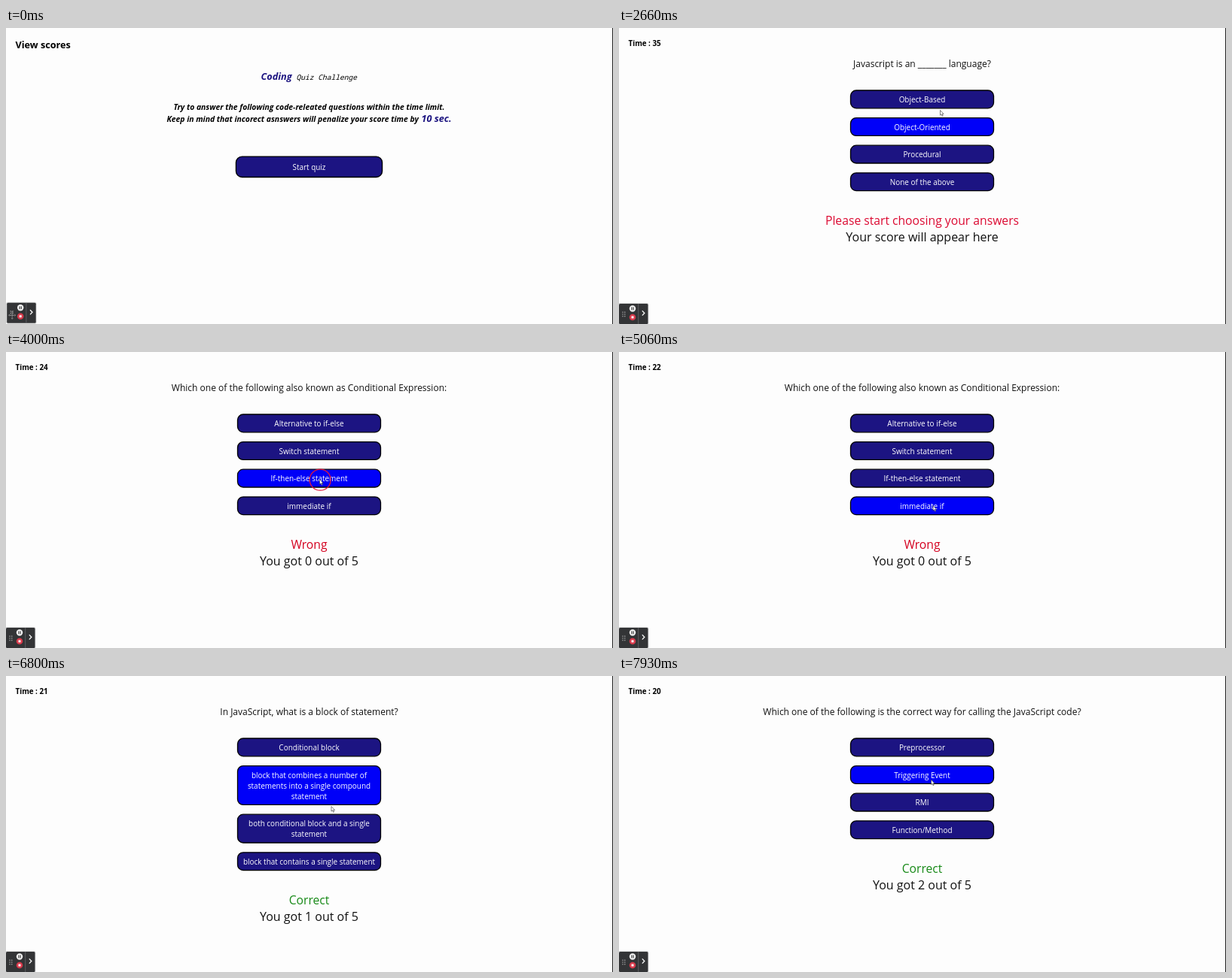
These frames come from a looping animation (806 px wide and 394 px high, 8000 ms). An HTML page:

```html
<!DOCTYPE html>
<html lang="en">
<head>
<meta charset="utf-8">
<title>Coding quiz</title>
<style>
  html, body { margin: 0; height: 100%; overflow: hidden; background: #fdfdfd; }
  svg { display: block; width: 100vw; height: 100vh; font-family: "Open Sans", "Noto Sans", sans-serif; }
  .mid { text-anchor: middle; }
  .bold { font-weight: 700; }
  .intro { font-weight: 700; font-style: italic; font-size: 10.38px; }
  .accent { fill: #1c1480; font-size: 12.7px; font-weight: 700; font-style: italic; }
  .mono { font: italic 500 9.6px "Noto Sans Mono", monospace; }
  .label { fill: #fff; font-size: 9.95px; }
</style>
</head>
<body>
<svg id="stage" viewBox="0 0 806 394"></svg>
<script>
const LOOP = 8000, CENTER = 402.5, HOVER_LAG = 100, SWITCH_DELAY = 40;
const LINE = 14, BUTTON_H = 23.8, GAP = 12.8, PENALTY = 10;
const RED = '#d4001f', GREEN = '#188a18';
const stage = document.getElementById('stage');

const questions = [
  { title: 'Javascript is an _______ language?',
    answers: ['Object-Based', 'Object-Oriented', 'Procedural', 'None of the above'],
    note: 'Please start choosing your answers', color: '#dc0a32', score: 'Your score will appear here' },
  { title: 'Which one of the following also known as Conditional Expression:',
    answers: ['Alternative to if-else', 'Switch statement', 'If-then-else statement', 'immediate if'],
    note: 'Wrong', color: RED, score: 'You got 0 out of 5' },
  { title: 'In JavaScript, what is a block of statement?',
    answers: ['Conditional block',
      'block that combines a number of|statements into a single compound|statement',
      'both conditional block and a single|statement',
      'block that contains a single statement'],
    note: 'Correct', color: GREEN, score: 'You got 1 out of 5' },
  { title: 'Which one of the following is the correct way for calling the JavaScript code?',
    answers: ['Preprocessor', 'Triggering Event', 'RMI', 'Function/Method'],
    note: 'Correct', color: GREEN, score: 'You got 2 out of 5' }
];

// Pointer path: [time, x, y]
const path = [
  [0, 8, 383], [460, 205, 290], [730, 205, 290], [1400, 390, 184.5], [2100, 390, 184.5],
  [2500, 424, 128], [2660, 426.5, 109.5], [2860, 427, 97], [3100, 425, 100],
  [3650, 416.5, 169.5], [4150, 416.5, 169.5], [4950, 417, 204.5], [5800, 417, 204.5],
  [6350, 427, 140], [6620, 430, 160], [6800, 432, 173.5], [7000, 430, 195],
  [7450, 414.5, 138], [LOOP, 414.5, 138]
];
const clicks = [2000, 3800, 5400, 7530];

const smooth = u => u * u * (3 - 2 * u);

function pointerAt(time) {
  const t = Math.max(0, time);
  const i = Math.max(1, path.findIndex(p => p[0] >= t));
  const [t0, x0, y0] = path[i - 1], [t1, x1, y1] = path[i];
  const u = smooth((t - t0) / (t1 - t0));
  return [x0 + (x1 - x0) * u, y0 + (y1 - y0) * u];
}

const text = (x, y, content, attrs) => `<text x="${x}" y="${y}" ${attrs}>${content}</text>`;
const centered = (y, content, size, fill = '#111') =>
  text(CENTER, y, content, `class="mid" font-size="${size}" fill="${fill}"`);

function button(y, width, height, lines, hover, radius) {
  const x = CENTER - width / 2, [hx, hy] = hover;
  const over = hx >= x && hx <= x + width && hy >= y && hy <= y + height;
  const first = y + height / 2 + 4.1 - (lines.length - 1) * LINE / 2;
  return `<rect x="${x}" y="${y}" width="${width}" height="${height}" rx="${radius}"
      fill="${over ? '#0000f8' : '#1c1482'}" stroke="#000" stroke-width="1.3"/>` +
    lines.map((line, i) => text(CENTER, first + i * LINE, line, 'class="mid label"')).join('');
}

function startPage(hover) {
  return text(12.5, 27.2, 'View scores', 'class="bold" font-size="12.65"') +
    text(338.5, 69.3, 'Coding', 'class="accent"') +
    text(385.5, 69.1, 'Quiz Challenge', 'class="mono"') +
    text(CENTER, 109.2, 'Try to answer the following code-releated questions within the time limit.', 'class="mid intro"') +
    text(CENTER, 125.2, 'Keep in mind that incorect asnswers will penalize your score time by <tspan class="accent" dx="1">10 sec.</tspan>', 'class="mid intro"') +
    button(171.1, 194.2, 27.4, ['Start quiz'], hover, 8);
}

function quizPage(question, seconds, hover) {
  let y = 83, out = text(12.5, 23.6, `Time : ${seconds}`, 'class="bold" font-size="9.8"') +
    centered(52, question.title, 12.03);
  for (const answer of question.answers) {
    const lines = answer.split('|');
    const height = BUTTON_H + (lines.length - 1) * LINE;
    out += button(y, 190, height, lines, hover, 7.5);
    y += height + GAP;
  }
  return out + centered(y + 32.5, question.note, 15.7, question.color) +
    centered(y + 54.7, question.score, 16);
}

function toolbar(dragged) {
  let dots = '';
  for (let i = 0; i < 6; i++)
    dots += `<circle cx="${5 + i % 2 * 2.8}" cy="${378.2 + (i >> 1) * 2.8}" r=".7" fill="#bbb"/>`;
  const moveIcon = dragged ? `<path d="M7 378.5v10M2.5 383.5h9M5.8 379.8l1.2-1.4 1.2 1.4M5.8 387.2l1.2 1.4 1.2-1.4
      M3.8 382.3l-1.4 1.2 1.4 1.2M10.2 382.3l1.4 1.2-1.4 1.2" fill="none" stroke="#999" stroke-width=".7"/>` : '';
  return `<g transform="translate(${dragged ? '1.2 -1.2' : '0 0'})">
    <rect x="-1" y="366" width="40.3" height="29" rx="2" fill="#000" opacity=".15"/>
    <rect x="0" y="367" width="38.5" height="27" rx="1.5" fill="#333436"/>
    ${dots}${moveIcon}
    <circle cx="18" cy="373.5" r="4.2" fill="#f4f4f4"/>
    <path d="M16.9 371.6v3.8M19.1 371.6v3.8" stroke="#333" stroke-width="1.1"/>
    <circle cx="18" cy="385" r="4.3" fill="#d6394a"/>
    <rect x="16.5" y="383.5" width="3" height="3" fill="#fff"/>
    <path d="M25.7 367v27" stroke="#66686a" stroke-width=".8"/>
    <path d="M30.8 376.4l3 3.1-3 3.1" fill="none" stroke="#fff" stroke-width="1.3"/></g>`;
}

function ripple(t) {
  const start = clicks.find(c => t >= c && t < c + 300);
  if (start === undefined) return '';
  const [x, y] = pointerAt(start);
  const radius = 4 + 10 * Math.min(1, (t - start) / 200);
  return `<circle cx="${x + 0.7}" cy="${y + 0.7}" r="${radius}" fill="none" stroke="#e0183c" stroke-width="1.3"/>`;
}

const arrow = ([x, y]) => `<path transform="translate(${x} ${y})"
  d="M0 0v6.6l1.5-1.3 1.1 2.5 1.1-.5-1.1-2.4h2z" fill="#fff" stroke="#333" stroke-width=".6"/>`;

function draw(t) {
  const hover = pointerAt(t - HOVER_LAG);
  const page = clicks.filter(c => t >= c + SWITCH_DELAY).length;
  const elapsed = Math.floor((t - clicks[0] - SWITCH_DELAY) / 1000);
  const seconds = 35 - elapsed - (page > 1 ? PENALTY : 0);
  const dragged = t < 120;
  stage.innerHTML = '<rect width="806" height="394" fill="#fdfdfd"/>' +
    (page ? quizPage(questions[page - 1], seconds, hover) : startPage(hover)) +
    '<rect x="805" width="1" height="394" fill="#222"/>' +
    toolbar(dragged) + ripple(t) + (dragged ? '' : arrow(pointerAt(t)));
}

const began = performance.now();
function frame() {
  draw((performance.now() - began) % LOOP);
  requestAnimationFrame(frame);
}
frame();
</script>
</body>
</html>
```
